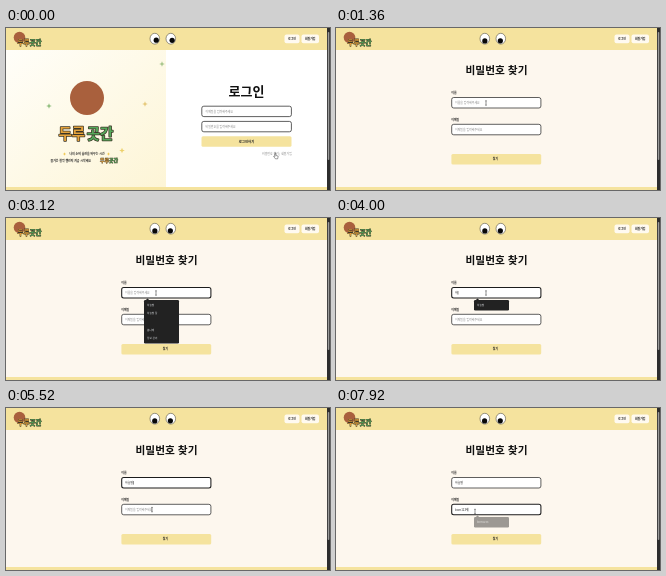
Animation of 324 by 162 pixels, one loop 8000 ms. Source, as an HTML page:

```html
<!DOCTYPE html>
<html lang="ko">
<head>
<meta charset="utf-8">
<title>비밀번호 찾기</title>
<style>
  html, body { margin: 0; width: 100%; height: 100%; overflow: hidden; background: #fdf7ee; }
  svg { display: block; width: 100%; height: 100%; }
  text { font: 2.9px "Noto Sans CJK KR", "Noto Sans CJK", "Noto Sans", sans-serif; fill: #222; }
  .bold { font-weight: 700; }
  .title { font-weight: 900; fill: #111; }
  .hint { fill: #858585; }
  .mid { text-anchor: middle; }
  .brand { font-weight: 900; paint-order: stroke; stroke: #3b3526; stroke-linejoin: round; }
  .warm { fill: #e5a33c; }
  .leaf { fill: #55a85a; }
  .field { fill: #fff; stroke: #1c1c1c; stroke-width: .7; }
  .button { fill: #f5e39e; }
  .menu text { fill: #d5d8dc; font-size: 2.6px; }
</style>
</head>
<body>
<svg viewBox="0 0 324 162" preserveAspectRatio="none">
  <defs>
    <linearGradient id="panel" x1="0" y1="0" x2="1" y2="1">
      <stop offset="0" stop-color="#fffef9"/>
      <stop offset="1" stop-color="#fdf5d6"/>
    </linearGradient>
  </defs>
  <rect width="324" height="162" fill="#fdf7ee"/>

  <g id="login">
    <rect y="22" width="160" height="137" fill="url(#panel)"/>
    <rect x="160" y="22" width="161" height="137" fill="#fff"/>
    <circle cx="81" cy="70" r="17" fill="#a9603d"/>
    <text class="brand" x="52.5" y="111" style="font-size:14.5px;stroke-width:1.5px"><tspan class="warm">두루</tspan><tspan class="leaf" dx="1.5">곳간</tspan></text>
    <text class="mid bold" x="81" y="127.2">나의 소비 습관을 바꾸는 시간</text>
    <text class="bold" x="44.5" y="133.7">즐거운 절약 챌린지 지금 시작해요</text>
    <text class="brand" x="94" y="134" style="font-size:4.9px;stroke-width:.6px"><tspan class="warm">두루</tspan><tspan class="leaf">곳간</tspan></text>
    <g id="sparks"></g>
    <text class="title mid" x="240.5" y="67.7" style="font-size:13px">로그인</text>
    <rect class="field" x="195.8" y="78.2" width="89.6" height="10.4" rx="2"/>
    <text class="hint" x="199.5" y="84.5">이메일을 입력해주세요</text>
    <rect class="field" x="195.8" y="93.4" width="89.6" height="10.4" rx="2"/>
    <text class="hint" x="199.5" y="99.7">비밀번호를 입력해주세요</text>
    <rect class="button" x="195.5" y="108.2" width="90" height="10.6" rx="1.5"/>
    <text class="bold mid" x="240.5" y="114.6" style="font-size:3.4px">로그인하기</text>
    <text class="hint" x="285.8" y="127" text-anchor="end"><tspan id="link">비밀번호 찾기</tspan> | 회원가입</text>
  </g>

  <g id="find">
    <text class="title mid" x="160.5" y="46" style="font-size:10.7px">비밀번호 찾기</text>
    <text class="bold" x="115.3" y="66">이름</text>
    <rect class="field" id="box0" x="115.7" y="69.5" width="89.2" height="10.5" rx="2"/>
    <text id="value0" x="119" y="75.9"></text>
    <text class="bold" x="115.3" y="92.6">이메일</text>
    <rect class="field" id="box1" x="115.7" y="96.3" width="89.2" height="10.5" rx="2"/>
    <text id="value1" x="119" y="102.7"></text>
    <rect id="caret" width=".45" height="3.6" fill="#111"/>
    <rect class="button" x="115.4" y="126" width="89.8" height="10.6" rx="1.5"/>
    <text class="bold mid" x="159.5" y="132.4">찾기</text>
    <g id="menu" class="menu">
      <path id="menuTip" fill="#222"/>
      <rect id="menuBody" x="138" width="35" rx="1.3" fill="#222"/>
      <g id="menuRows"></g>
    </g>
  </g>

  <rect width="321" height="22" fill="#f5e39e"/>
  <rect y="159" width="321" height="3" fill="#f5e39e"/>
  <circle cx="13.5" cy="9.5" r="5.8" fill="#a9603d"/>
  <text class="brand" x="11.5" y="17" style="font-size:6.5px;stroke-width:.8px"><tspan class="warm">두루</tspan><tspan class="leaf">곳간</tspan></text>
  <g id="eyes"></g>
  <rect x="278.5" y="6.5" width="15" height="8.7" rx="2" fill="#fffaf0"/>
  <text class="bold mid" x="286" y="11.9">로그인</text>
  <rect x="295.5" y="6.5" width="17.5" height="8.7" rx="2" fill="#fffaf0"/>
  <text class="bold mid" x="304.2" y="11.9">회원가입</text>
  <rect x="321" width="3" height="162" fill="#2d2d2d"/>
  <rect x="321.8" y="4" width="1.5" height="128" rx=".7" fill="#9b9b9b"/>
  <g id="pointer">
    <path id="hand" d="M0-1V2.6L-.9 1.8-1.4 2.4.4 4.8H2.7L3.2 2.2.9 1.4V-1Z" fill="#fff" stroke="#111" stroke-width=".4"/>
    <path id="beam" d="M-.8-2.2H.8M0-2.2V2.2M-.8 2.2H.8" fill="none" stroke="#222" stroke-width=".5"/>
  </g>
</svg>
<script>
const LOOP = 8000, PAGE_CHANGE = 800, FOCUS = 1440, NEXT_FIELD = 5760;
const $ = id => document.getElementById(id);
const show = (el, on) => { el.style.display = on ? "" : "none"; };

function make(parent, tag, attrs) {
  const el = document.createElementNS("http://www.w3.org/2000/svg", tag);
  for (const key in attrs) el.setAttribute(key, attrs[key]);
  return parent.appendChild(el);
}

// Each track row: time, then values.
const pointerTrack = [
  [0, 269, 126], [480, 265, 125.5], [900, 265, 127], [1300, 150, 75],
  [4640, 150, 75], [5280, 146, 101], [5700, 146, 102], [6240, 139, 103.5]
];
const blinkTrack = [
  [2600, 1], [2700, .08], [2840, .08], [2960, 1],
  [6640, 1], [6740, .08], [6880, .08], [7000, 1]
];
const menuTrack = [
  [2880, 0], [2960, 1], [4560, 1], [4720, 0],
  [6320, 0], [6400, 1], [6960, 1], [7080, 0],
  [7520, 0], [7600, 1], [7840, 1], [7990, 0]
];
const typing = [
  { hint: "이름을 입력해주세요", steps: [[3680, "ㅎ"], [3840, "하"], [4160, "하느"], [4320, "하늘"], [4480, "하늘벼"], [4640, "하늘별"]] },
  { hint: "이메일을 입력해주세요", steps: [[6320, "b"], [6560, "bo"], [7200, "bom"], [7360, "bom1"], [7520, "bom12"], [7680, "bom123"], [7840, "bom1234"]] }
];

const ease = u => u * u * (3 - 2 * u);
function sample(track, t) {
  const next = track.findIndex(row => row[0] > t);
  if (next === 0) return track[0].slice(1);
  if (next < 0) return track[track.length - 1].slice(1);
  const a = track[next - 1], b = track[next];
  const u = ease((t - a[0]) / (b[0] - a[0]));
  return a.slice(1).map((v, i) => v + (b[i + 1] - v) * u);
}

const eyes = [148.8, 164.8].map(x => {
  const group = make($("eyes"), "g", {});
  make(group, "ellipse", { rx: 4.8, ry: 5.4, fill: "#fff", stroke: "#333", "stroke-width": .5 });
  return { x, group, pupil: make(group, "circle", { r: 2.6, fill: "#080808" }) };
});

const sparks = [
  [156, 36, "#a5c58a"], [43, 78, "#8fbd7c"], [139, 76, "#e6c878"], [116, 122.5, "#ecd06a"]
].map(([x, y, fill]) => ({
  x, y, el: make($("sparks"), "path", { d: "M0-2.8L.8-.8 2.8 0 .8.8 0 2.8-.8.8-2.8 0-.8-.8Z", fill })
}));
for (const x of [58.5, 102.5])
  make($("login"), "path", { d: "M0-1.7L.5-.5 1.7 0 .5.5 0 1.7-.5.5-1.7 0-.5-.5Z", fill: "#f0c64c", transform: `translate(${x} 126)` });

const rows = ["하늘별", "하늘별 달", "봄나래", "정보 관리"].map(label => {
  const el = make($("menuRows"), "text", { x: 141 });
  el.textContent = label;
  return el;
});

function drawMenu(t) {
  const second = t > NEXT_FIELD, full = t < 3680;
  const top = second ? 109 : 82, height = full ? 43.5 : 10.5;
  $("menu").setAttribute("opacity", sample(menuTrack, t)[0]);
  $("menuTip").setAttribute("d", `M139.5 ${top + .2}l2-1.8 2 1.8z`);
  $("menuBody").setAttribute("y", top);
  $("menuBody").setAttribute("height", height);
  rows.forEach((row, i) => {
    row.setAttribute("y", top + [6, 14, 30.5, 38.8][i]);
    show(row, full || i === 0);
  });
  rows[0].textContent = second ? "bom1234" : "하늘별";
}

function drawFields(t) {
  const active = t < FOCUS ? -1 : t < NEXT_FIELD ? 0 : 1;
  typing.forEach(({ hint, steps }, i) => {
    const typed = steps.filter(([at]) => at <= t).pop();
    const value = $("value" + i), text = typed ? typed[1] : hint;
    if (value.textContent !== text) value.textContent = text;
    value.setAttribute("class", typed ? "" : "hint");
    $("box" + i).style.strokeWidth = active === i ? 1.05 : .7;
    if (active === i) {
      $("caret").setAttribute("x", 119.1 + (typed ? value.getComputedTextLength() : 0));
      $("caret").setAttribute("y", i ? 99.8 : 73);
    }
  });
  show($("caret"), active >= 0 && (t - FOCUS) % 1000 < 600);
}

function render(t) {
  const login = t < PAGE_CHANGE;
  show($("login"), login);
  show($("find"), !login);
  const [px, py] = sample(pointerTrack, t);
  $("pointer").setAttribute("transform", `translate(${px} ${py})`);
  const overField = t >= 1240;
  show($("hand"), !overField);
  show($("beam"), overField);
  $("link").style.fill = t > 240 ? "#dfc46c" : "#858585";

  const open = sample(blinkTrack, t)[0];
  for (const { x, group, pupil } of eyes) {
    const angle = Math.atan2(py - 10.7, px - x);
    pupil.setAttribute("cx", 2 * Math.cos(angle));
    pupil.setAttribute("cy", 2.2 * Math.sin(angle));
    group.setAttribute("transform", `translate(${x} 10.7) scale(1 ${open})`);
  }
  if (login) {
    for (const { x, y, el } of sparks)
      el.setAttribute("transform", `translate(${x - t * .0015} ${y + t * .0118}) rotate(${t * .03})`);
  } else {
    drawFields(t);
    drawMenu(t);
  }
}

const start = performance.now();
function tick() {
  render((performance.now() - start) % LOOP);
  requestAnimationFrame(tick);
}
tick();
</script>
</body>
</html>
```
